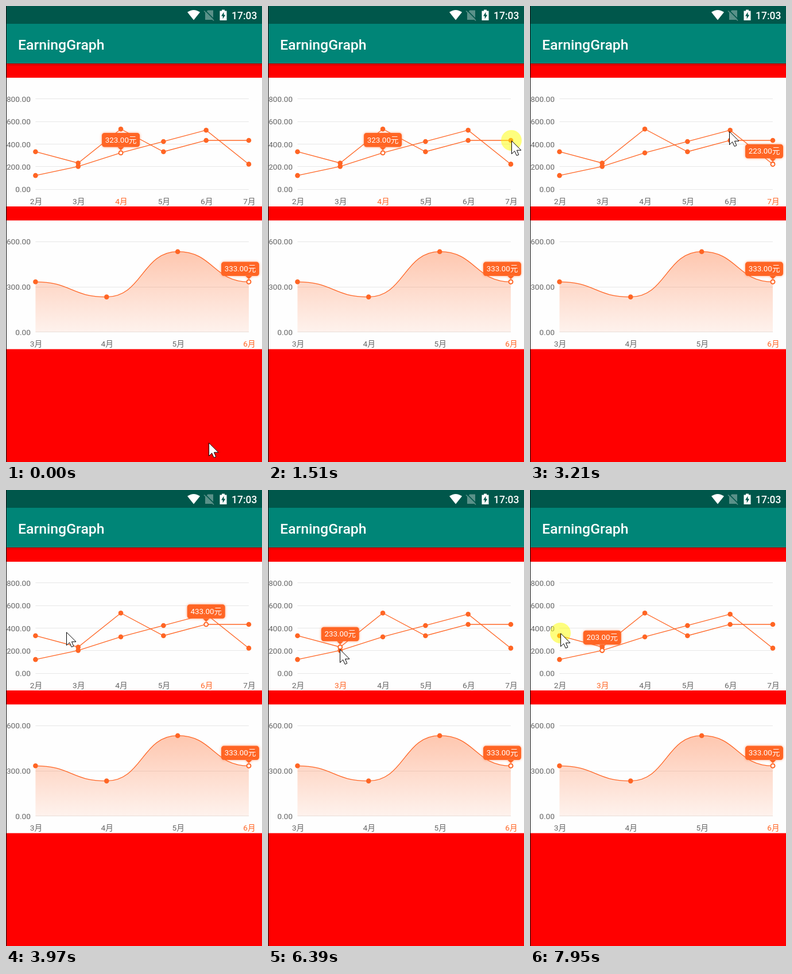
Animation, 446 px wide and 794 px high, one loop 8 s. Source, as an HTML page with a canvas:

```html
<!DOCTYPE html>
<html lang="zh">
<head>
<meta charset="utf-8">
<title>EarningGraph</title>
<style>
html, body { margin: 0; width: 100%; height: 100%; overflow: hidden; background: #f00; }
canvas { display: block; width: 446px; height: 794px; }
</style>
</head>
<body>
<canvas id="stage" width="446" height="794"></canvas>
<script>
const ctx = document.getElementById('stage').getContext('2d');
const LOOP = 8000;
const TICK = 76; // the pointer is redrawn once per tick
const ORANGE = '#ff6524';
const DARK = '#00574b';
const FONT = 'Roboto, "Noto Sans CJK SC", "Noto Sans CJK", sans-serif';
const LEFT = 51.4, RIGHT = 423;

const move = (from, to, x, y) => ({ from, to, x, y });
const tap = at => ({ from: at, tap: true });

const script = [
  move(70, 120, 446, 415),
  move(350, 890, 433, 229),
  move(1040, 1120, 423, 228),
  move(1350, 1430, 424, 234), tap(1510),
  move(2120, 2280, 424, 273), tap(2360),
  move(2590, 3210, 346, 217), tap(3360), tap(3740),
  move(3890, 3970, 99, 248),
  move(4140, 4290, 130, 269),
  move(4920, 4920, 128, 284), tap(5000), tap(5470),
  move(5770, 5850, 125, 273), tap(6080),
  move(6310, 6540, 125, 282), tap(6850),
  move(7170, 7780, 53, 249), tap(7950)
];

function makeChart(y, max, step, month, smooth, series) {
  const last = series[0].length - 1;
  const zero = y + 194.5;
  return {
    y, max, step, month, smooth, series, last, zero,
    toX: i => LEFT + i * (RIGHT - LEFT) / last,
    toY: v => zero - v * 157.8 / max
  };
}

const top6 = makeChart(124.9, 800, 200, 2, false,
  [[333, 233, 533, 333, 433, 433], [123, 203, 323, 423, 523, 223]]);
const low4 = makeChart(373.4, 600, 300, 3, true, [[333, 233, 533, 333]]);

// A tap picks the point under it; tapping the chosen month again switches line.
function pick(chart, old, [x, y]) {
  const index = Math.round((x - LEFT) / (RIGHT - LEFT) * chart.last);
  const hit = chart.series.findIndex(s => Math.abs(chart.toY(s[index]) - y) < 4);
  let line = hit < 0 ? old.line : hit;
  if (index === old.index && line === old.line) line = 1 - line;
  return { line, index };
}

function stateAt(t) {
  let pos = [353, 760], chosen = { line: 1, index: 2 }, pressed = false;
  for (const step of script) {
    const age = t - step.from;
    if (age < 0) break;
    if (step.tap) {
      pressed = age < 2 * TICK;
      if (age >= TICK) chosen = pick(top6, chosen, pos);
    } else {
      const shown = (Math.floor(age / TICK) + 1) * TICK;
      const done = Math.min(1, shown / (step.to - step.from + TICK));
      pos = [pos[0] + (step.x - pos[0]) * done, pos[1] + (step.y - pos[1]) * done];
      pressed = false;
    }
  }
  return { pos: pos.map(Math.round), chosen, pressed };
}

function rect(color, x, y, w, h) {
  ctx.fillStyle = color;
  ctx.fillRect(x, y, w, h);
}

function text(str, x, y, color, align = 'center', size = 13.7, weight = 400) {
  ctx.font = `${weight} ${size}px ${FONT}`;
  ctx.textAlign = align;
  ctx.fillStyle = color;
  ctx.fillText(str, x, y);
}

function poly(color, ...points) {
  ctx.fillStyle = color;
  ctx.beginPath();
  points.forEach(([x, y]) => ctx.lineTo(x, y));
  ctx.closePath();
  ctx.fill();
}

function disc(x, y, r, color) {
  ctx.fillStyle = color;
  ctx.beginPath();
  ctx.arc(x, y, r, 0, Math.PI * 2);
  ctx.fill();
}

function fade(y0, y1, rgb, a0, a1) {
  const g = ctx.createLinearGradient(0, y0, 0, y1);
  g.addColorStop(0, `rgba(${rgb},${a0})`);
  g.addColorStop(1, `rgba(${rgb},${a1})`);
  return g;
}

function statusBar() {
  const faint = '#5a9189';
  rect(DARK, 0, 0, 446, 31);

  ctx.fillStyle = '#fff';
  ctx.beginPath();
  ctx.moveTo(327, 24.5);
  ctx.lineTo(316, 10.8);
  ctx.quadraticCurveTo(327, 3.2, 338, 10.8);
  ctx.fill();

  poly(faint, [347, 12], [351.5, 7.5], [361, 7.5], [361, 24], [347, 24]);
  ctx.lineWidth = 1.6;
  for (const [color, shift] of [[DARK, 1.4], [faint, 0]]) {
    ctx.strokeStyle = color;
    ctx.beginPath();
    ctx.moveTo(345 + shift, 8.5 - shift);
    ctx.lineTo(362 + shift, 25.5 - shift);
    ctx.stroke();
  }

  rect('#fff', 376, 6.5, 5, 3);
  rect('#fff', 372.5, 8.5, 12, 16.5);
  poly(DARK, [379.5, 10.5], [375, 17.5], [377.7, 17.5], [377.7, 22.5], [382.2, 15.5], [379.5, 15.5]);
  text('17:03', 437.5, 22.5, '#fff', 'right', 17.5, 500);
}

function appBar() {
  rect('#008577', 0, 31, 446, 69);
  rect(fade(100, 105, '60,0,0', 0.35, 0), 0, 100, 446, 5);
  text('EarningGraph', 21, 76, '#fff', 'left', 24.8, 500);
}

function curve(points, smooth) {
  ctx.beginPath();
  points.forEach(([x, y], i) => {
    if (!i) return ctx.moveTo(x, y);
    if (!smooth) return ctx.lineTo(x, y);
    const [px, py] = points[i - 1];
    const mid = (px + x) / 2;
    ctx.bezierCurveTo(mid, py, mid, y, x, y);
  });
}

function bubble(value, x, y) {
  const left = Math.min(x - 33, 375);
  ctx.save();
  ctx.shadowColor = 'rgba(255,101,36,.6)';
  ctx.shadowBlur = 4;
  ctx.fillStyle = ORANGE;
  ctx.beginPath();
  ctx.roundRect(left, y - 34.7, 66, 24.5, 4.5);
  ctx.moveTo(x - 6, y - 10.5);
  ctx.lineTo(x, y - 4.5);
  ctx.lineTo(x + 6, y - 10.5);
  ctx.fill();
  ctx.restore();
  text(value.toFixed(2) + '元', left + 33, y - 18, '#fff', 'center', 13.4);
}

function drawChart(c, { line, index }) {
  rect('#fefefe', 0, c.y, 446, 224.1);

  for (let v = 0; v <= c.max; v += c.step) {
    rect('#e7e7e7', LEFT, Math.round(c.toY(v) - 0.5), RIGHT - LEFT, 1);
    text(v.toFixed(2), 43, c.toY(v) + 5, '#666', 'right');
  }
  for (let i = 0; i <= c.last; i++) {
    text(c.month + i + '月', c.toX(i) + 1, c.zero + 25.5, i === index ? ORANGE : '#666');
  }

  const lines = c.series.map(s => s.map((v, i) => [c.toX(i), c.toY(v)]));
  for (const points of lines) {
    curve(points, c.smooth);
    ctx.strokeStyle = ORANGE;
    ctx.lineWidth = 1.3;
    ctx.stroke();
    if (c.smooth) {
      ctx.lineTo(RIGHT, c.zero);
      ctx.lineTo(LEFT, c.zero);
      ctx.fillStyle = fade(c.toY(533), c.zero, '255,101,36', 0.36, 0.08);
      ctx.fill();
    }
  }
  lines.flat().forEach(([x, y]) => disc(x, y, 4.3, ORANGE));

  const [x, y] = lines[line][index];
  disc(x, y, 4.3, ORANGE);
  disc(x, y, 2.5, '#fff');
  bubble(c.series[line][index], x, y);
}

function pointer([x, y], pressed) {
  if (pressed) disc(x, y, 18, 'rgba(255,255,0,.5)');
  ctx.save();
  ctx.translate(x, y);
  poly('#fff', [0.5, 0.8], [0.5, 23.5], [5.6, 18.6], [9.2, 26.4], [12.8, 24.9], [9.5, 17.2], [17, 17.2]);
  ctx.strokeStyle = '#000';
  ctx.lineWidth = 1;
  ctx.stroke();
  ctx.restore();
}

function draw(t) {
  const { pos, chosen, pressed } = stateAt(t);
  rect('#f00', 0, 0, 446, 794);
  statusBar();
  appBar();
  drawChart(top6, chosen);
  drawChart(low4, { line: 0, index: 3 });
  rect('#111', 0, 0, 1, 794);
  pointer(pos, pressed);
}

const begin = performance.now();
function tick() {
  draw((performance.now() - begin) % LOOP);
  requestAnimationFrame(tick);
}
tick();
</script>
</body>
</html>
```
